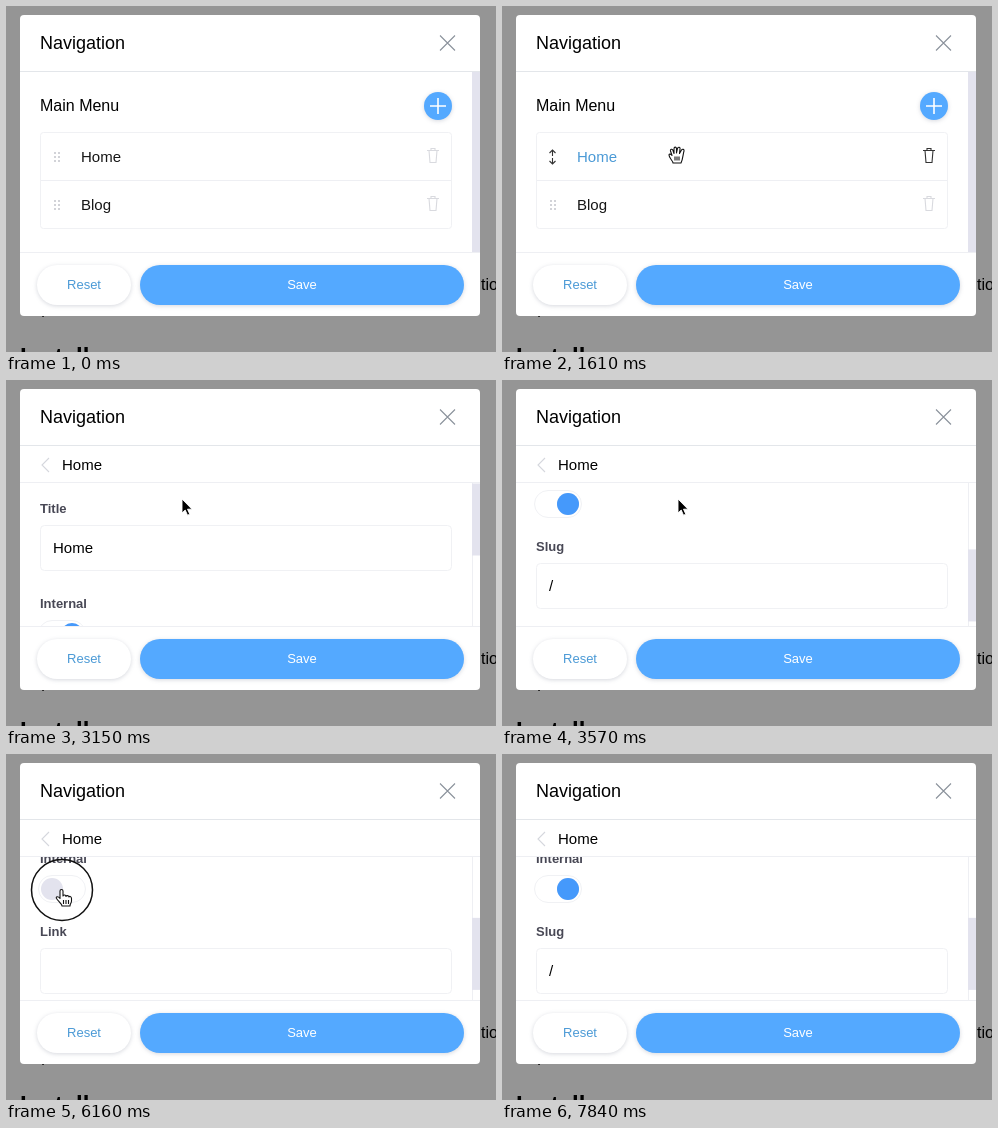
An HTML page that plays this animation: 490x346 px, repeating every 8.26 s.

```html
<!DOCTYPE html>
<html lang="en">
<head>
<meta charset="utf-8">
<title>Navigation editor</title>
<style>
  html, body { margin: 0; width: 100%; height: 100%; overflow: hidden; background: #959595; }
  svg { display: block; width: 490px; height: 346px; font: 15px "Liberation Sans", Arial, sans-serif; }
  .label { font-weight: bold; font-size: 13px; fill: #484855; }
  .box { fill: #fff; stroke: #f0f1f4; }
  .rule { stroke: #eeeff3; }
  .line { fill: none; stroke-width: 1.1; }
  .soft { filter: drop-shadow(0 1px 2px rgba(50, 60, 90, .2)); }
  .skin { fill: #fff; stroke: #111; stroke-width: 1.1; stroke-linejoin: round; }
</style>
</head>
<body>
<svg viewBox="0 0 490 346">
  <defs>
    <clipPath id="listClip"><rect x="14" y="66" width="460" height="180"/></clipPath>
    <clipPath id="formClip"><rect x="14" y="103" width="460" height="143"/></clipPath>
  </defs>

  <rect width="490" height="346" fill="#959595"/>
  <text x="475" y="284" font-size="16">tion</text>
  <text x="14" y="308" font-size="16">step.</text>
  <text x="14" y="359" font-size="24" font-weight="bold">Install</text>

  <rect x="14" y="9" width="460" height="301" rx="4" fill="#fff"/>
  <text x="34" y="43" font-size="18">Navigation</text>
  <path class="line" d="M434 29.500l15 15m0-15l-15 15" stroke="#8b929c"/>

  <g id="menu" clip-path="url(#listClip)">
    <text x="34" y="105" font-size="16">Main Menu</text>
    <circle class="soft" cx="432" cy="100" r="14" fill="#54a9ff"/>
    <path d="M424 100h16m-8-8v16" stroke="#fff" stroke-width="1.6"/>
    <rect class="box" x="34.500" y="126.500" width="411" height="96" rx="3"/>
    <path class="rule" d="M35 174.500h410"/>
    <g id="rows"></g>
    <rect x="466" y="66" width="8" height="180" fill="#e3e3ee"/>
  </g>

  <g id="detail">
    <path class="line" d="M43 78l-7 7 7 7" stroke="#d5d7dd"/>
    <text x="56" y="90">Home</text>
    <path class="rule" d="M14 102.500h460"/>
    <g clip-path="url(#formClip)">
      <g id="form">
        <text class="label" x="34" y="133">Title</text>
        <rect class="box" x="34.500" y="145.500" width="411" height="45" rx="4"/>
        <text x="47" y="173">Home</text>
        <text class="label" x="34" y="228">Internal</text>
        <rect class="box" x="32.500" y="240.500" width="47" height="27" rx="13.500"/>
        <g id="knob">
          <circle cy="254" r="11" fill="#e3e3ee"/>
          <circle id="knobOn" cy="254" r="11" fill="#4599fb"/>
        </g>
        <text id="fieldLabel" class="label" x="34" y="301"></text>
        <rect class="box" x="34.500" y="313.500" width="411" height="45" rx="4"/>
        <text id="fieldValue" x="47" y="341"></text>
      </g>
      <rect x="466" y="103" width="8" height="143" fill="#fff"/>
      <path class="rule" d="M466.500 103v143"/>
      <rect id="thumb" x="466" y="103.500" width="8" height="72" fill="#e3e3ee"/>
    </g>
  </g>

  <path d="M14 65.500h460" stroke="#e3e6ea"/>
  <path class="rule" d="M14 246.500h460"/>
  <rect class="soft" x="31" y="259" width="94" height="40" rx="20" fill="#fff"/>
  <rect class="soft" x="134" y="259" width="324" height="40" rx="20" fill="#54a9ff"/>
  <g font-size="13" text-anchor="middle">
    <text x="78" y="283" fill="#4b9ad6">Reset</text>
    <text x="296" y="283" fill="#fff">Save</text>
  </g>

  <g id="pointer">
    <circle id="press" r="30.500" fill="none" stroke="#111" stroke-width="1.5"/>
    <path id="arrow" d="M0 0V14L3.200 11L5.500 16.200L7.800 15.200L5.500 10.200H10Z" stroke="#fff" stroke-width=".9"/>
    <g id="hand" class="skin">
      <path d="M-2 1C-2-1 1-1 1 1V6C1 4.500 4 4.500 4 6.500C4 5 7 5.500 7 7C7 6 9.500 6 9.500 8.500V11C9.500 13 8 13.500 8 16H0C0 14-4 11-5.500 8.500C-6.500 6.500-4 6-2 8.500Z"/>
      <path d="M1.500 10v4m2.500-4v4m2.500-4v4"/>
    </g>
    <g id="grab" class="skin">
      <path d="M-4 8C-4 6-8 3-8 0C-8-1.500-6-1-5 .5L-6.500-4C-7-6-4.500-6.500-4-4.500L-3-1.500V-6C-3-8.500-.5-8.500-.5-6V-2L.5-6.500C1-8.500 3.500-8 3-6L2.500-1.500L4.500-5C5.500-6.500 7.500-5.500 7-4C6-1 6 4 4 8Z"/>
      <path d="M-2 1.500v4m2-4v4m2-4v4"/>
    </g>
    <path id="ibeam" class="line" d="M-3-8q3 0 3 2q0-2 3-2M0-6V6M-3 8q3 0 3-2q0 2 3 2" stroke="#111"/>
  </g>
</svg>

<script>
const LOOP = 8260, STEP = 70, MAX_SCROLL = 138;
const el = id => document.getElementById(id);
const show = (id, amount) => el(id).setAttribute('opacity', Number(amount));
const move = (id, x, y) => el(id).setAttribute('transform', `translate(${x} ${y})`);

// Each row: time, then values
const cursorPath = [
  [0, 190, 360], [210, 188, 297], [280, 188, 297], [560, 186, 262],
  [700, 186, 262], [1540, 175, 149], [2660, 175, 149], [2870, 176, 119],
  [4900, 176, 119], [5670, 56, 136], [7140, 56, 136], [7490, 172, 284],
  [7630, 172, 284], [7840, 175, 360]
];
const scrollPath = [
  [3150, 0], [3220, 8], [3290, 27], [3360, 55], [3430, 85], [3500, 112],
  [3570, 130], [3640, MAX_SCROLL], [4270, MAX_SCROLL], [4690, 119]
];
const fadePath = [[1890, 0], [2170, 1]];
const togglePath = [[6020, 1], [6160, 0], [6370, 0], [6510, 1]];
const presses = [[1890, 2030], [6090, 6300], [6370, 6510]];

const linear = p => p;
const smooth = p => p * p * (3 - 2 * p);

function sample(path, t, ease = linear) {
  const i = path.findIndex(key => key[0] > t);
  if (i < 0) return path.at(-1).slice(1);
  if (i === 0) return path[0].slice(1);
  const from = path[i - 1], to = path[i];
  const p = ease((t - from[0]) / (to[0] - from[0]));
  return from.slice(1).map((v, k) => v + (to[k + 1] - v) * p);
}

const within = (v, low, high) => v >= low && v <= high;

function cursorKind(x, y, onDetail, scroll) {
  if (within(x, 134, 458) && within(y, 259, 299)) return 'hand';
  if (!onDetail) return within(x, 34, 446) && within(y, 126, 222) ? 'grab' : 'arrow';
  if (within(x, 32, 80) && within(y + scroll, 240, 268)) return 'hand';
  const overTitle = scroll === 0 && within(y, 145, 191);
  const overField = scroll > 100 && within(y + scroll, 313, 359);
  return within(x, 34, 446) && (overTitle || overField) ? 'ibeam' : 'arrow';
}

function trash(color) {
  return `<path class="line" stroke="${color}" d="M421 -6.500h12m-8 0v-2h4v2m-6 0l1 12h6l1-12"/>`;
}

function row(name, y) {
  let dots = '';
  for (let i = 0; i < 6; i++)
    dots += `<rect x="${48 + i % 2 * 4}" y="${-5 + (i >> 1) * 4}" width="2" height="2" fill="#d2d3d8"/>`;
  return `<g transform="translate(0 ${y})">
    <g id="${name}Idle">${dots}${trash('#d9dadf')}<text x="75" y="5" fill="#161616">${name}</text></g>
    <g id="${name}Hover">
      <path class="line" stroke="#333" d="M50.500 -1v-6m-3 3l3-3 3 3M50.500 1v6m-3-3l3 3 3-3"/>
      ${trash('#333')}<text x="75" y="5" fill="#4b9ad6">${name}</text>
    </g></g>`;
}

el('rows').innerHTML = row('Home', 151) + row('Blog', 199);

function render(time) {
  const t = Math.floor(time % LOOP / STEP) * STEP;
  const [x, y] = sample(cursorPath, t, smooth);
  const [scroll] = sample(scrollPath, t);
  const [fade] = sample(fadePath, t);
  const [on] = sample(togglePath, t);
  const kind = cursorKind(x, y, fade > .5, scroll);

  show('menu', 1 - fade);
  show('detail', fade);
  for (const [name, top] of [['Home', 126], ['Blog', 174]]) {
    const hover = kind === 'grab' && within(y, top, top + 48);
    show(name + 'Hover', hover);
    show(name + 'Idle', !hover);
  }

  move('form', 0, -scroll);
  move('thumb', 0, scroll * 70 / MAX_SCROLL);
  move('knob', 46 + 20 * on, 0);
  show('knobOn', on);
  el('fieldLabel').textContent = on >= .5 ? 'Slug' : 'Link';
  el('fieldValue').textContent = on >= .5 ? '/' : '';

  move('pointer', x, y);
  for (const id of ['arrow', 'hand', 'grab', 'ibeam']) show(id, id === kind);
  show('press', presses.some(([start, end]) => t >= start && t < end));
}

const start = performance.now();
function tick() {
  render(performance.now() - start);
  requestAnimationFrame(tick);
}
tick();
</script>
</body>
</html>
```
